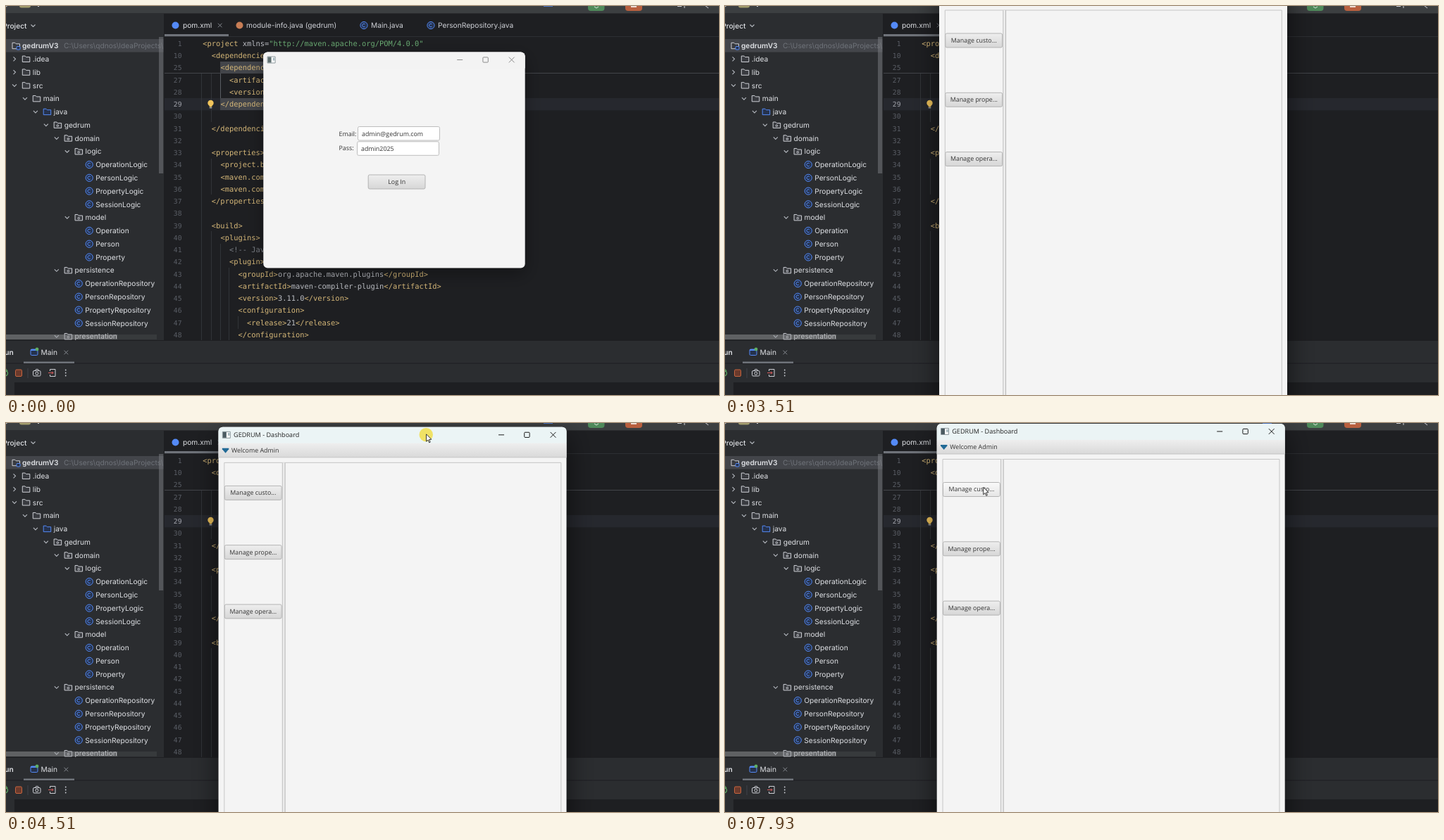
An HTML page with a canvas for the animation above (8000 ms loop, 1012 by 553 pixels).

```html
<!DOCTYPE html>
<html lang="en">
<head>
<meta charset="utf-8">
<title>Login and dashboard</title>
<style>
html, body { margin: 0; width: 100%; height: 100%; overflow: hidden; background: #1e1f22; }
canvas { display: block; width: 1012px; height: 553px; }
</style>
</head>
<body>
<canvas id="stage" width="1012" height="553"></canvas>
<script>
const ctx = document.getElementById('stage').getContext('2d');
const LOOP = 8000, STEP = 69;
const UI = 'Inter, sans-serif', FX = '"Open Sans", sans-serif', MONO = '"DejaVu Sans Mono", monospace';
const CHAR = 6.27, ROW = 18.78, LINE = 17.25;
const TAG = '#d5b778', PLAIN = '#bcbec4', GREEN = '#6aab73', DIM = '#7a7e85', BLUE = '#548af7', ICON = '#ced0d6';

// ---------- helpers ----------
function rect(x, y, w, h, fill) {
  ctx.fillStyle = fill;
  ctx.fillRect(x, y, w, h);
}
function box(x, y, w, h, r, fill, stroke, lw = 1) {
  ctx.beginPath();
  ctx.roundRect(x, y, w, h, r);
  if (fill) { ctx.fillStyle = fill; ctx.fill(); }
  if (stroke) { ctx.strokeStyle = stroke; ctx.lineWidth = lw; ctx.stroke(); }
}
function disc(x, y, r, fill, stroke) {
  box(x - r, y - r, 2 * r, 2 * r, r, fill, stroke);
}
function line(points, color, lw = 1) {
  ctx.beginPath();
  points.forEach(([x, y]) => ctx.lineTo(x, y));
  ctx.strokeStyle = color;
  ctx.lineWidth = lw;
  ctx.stroke();
}
function text(s, x, y, font, color, align = 'left') {
  ctx.font = font;
  ctx.fillStyle = color;
  ctx.textAlign = align;
  ctx.fillText(s, x, y);
}
function ui(s, x, y, color = '#dfe1e5', weight = 400) {
  text(s, x, y + 3.7, `${weight} 10.2px ${UI}`, color);
}
function fx(s, x, y, color = '#333', align = 'left', size = 8.9) {
  text(s, x, y + 3.2, `${size}px ${FX}`, color, align);
}
function shade(y, h, ...stops) {
  const g = ctx.createLinearGradient(0, y, 0, y + h);
  stops.forEach((c, i) => g.addColorStop(i / (stops.length - 1), c));
  return g;
}
function cross(x, y, r, color) {
  line([[x - r, y - r], [x + r, y + r]], color);
  line([[x + r, y - r], [x - r, y + r]], color);
}
function chevron(x, y, open) {
  line(open ? [[x - 3, y - 1.5], [x, y + 1.5], [x + 3, y - 1.5]]
            : [[x - 1.5, y - 3], [x + 1.5, y], [x - 1.5, y + 3]], '#b4b8bf', 1.1);
}

// ---------- IDE ----------
function folder(x, y, kind) {
  const c = kind === 'source' ? BLUE : ICON;
  ctx.beginPath();
  [[0, -4.2], [3.8, -4.2], [5.2, -2.7], [10.5, -2.7], [10.5, 4.2], [0, 4.2]]
    .forEach(([dx, dy]) => ctx.lineTo(x + dx, y + dy));
  ctx.closePath();
  ctx.fillStyle = kind === 'source' ? '#25324d' : '#393b40';
  ctx.fill();
  ctx.strokeStyle = c;
  ctx.lineWidth = 1;
  ctx.stroke();
  if (kind === 'package') disc(x + 5.2, y + 1, 1.3, null, c);
  if (kind === 'module') box(x + 6, y + 1, 5, 4.5, 1, '#25324d', BLUE);
}
function classIcon(x, y) {
  disc(x, y, 5.1, '#25324d', BLUE);
  ctx.beginPath();
  ctx.arc(x, y, 2.3, 0.8, 5.5);
  ctx.stroke();
}

const tree = [
  [0, '.idea', 'closed'], [0, 'lib', 'closed'], [0, 'src'], [1, 'main'], [2, 'java', 'source'],
  [3, 'gedrum', 'package'], [4, 'domain', 'package'], [5, 'logic', 'package'],
  ...['Operation', 'Person', 'Property', 'Session'].map(n => [6, n + 'Logic', 'class']),
  [5, 'model', 'package'],
  ...['Operation', 'Person', 'Property'].map(n => [6, n, 'class']),
  [4, 'persistence', 'package'],
  ...['Operation', 'Person', 'Property', 'Session'].map(n => [5, n + 'Repository', 'class']),
  [4, 'presentation', 'package']
];

function drawTree() {
  rect(0, 11, 224, 465, '#2b2d30');
  ctx.save();
  ctx.beginPath();
  ctx.rect(0, 11, 223.5, 464);
  ctx.clip();
  text('Project', 29.5, 31.5, `500 10.2px ${UI}`, '#dfe1e5', 'right');
  chevron(38.5, 28, true);
  rect(0, 47, 224, 18.6, '#43454a');
  folder(9, 56.5, 'module');
  ui('gedrumV3', 23, 56.5, '#dfe1e5', 600);
  ui('C:\\Users\\qdnos\\IdeaProjects\\gedrumV3', 82, 56.5, '#6f737a');
  tree.forEach(([depth, name, kind], i) => {
    const x = 12 + depth * 14.95, y = 75.3 + i * ROW;
    if (kind === 'class') {
      classIcon(x + 16.5, y);
      ui(name, x + 25.5, y);
    } else {
      chevron(x, y, kind !== 'closed');
      folder(x + 11.3, y, kind);
      ui(name, x + 25.8, y);
    }
  });
  rect(217, 44, 6.5, 194, 'rgba(125,127,130,.5)');
  rect(0, 467, 158, 7, 'rgba(150,152,155,.48)');
  rect(158, 467, 56, 7, 'rgba(120,122,125,.16)');
  ctx.restore();
}

// Each entry: line number, indent, text
const code = [
  [1, 0, '<project xmlns="http://maven.apache.org/POM/4.0.0"'],
  [10, 2, '<dependencies>'], [25, 4, '<dependency>'],
  [27, 6, '<artifactId>'], [28, 6, '<version>'], [29, 4, '</dependency>'], [30, 0, ''],
  [31, 2, '</dependencies>'], [32, 0, ''], [33, 2, '<properties>'],
  [34, 4, '<project.build.sourceEncoding>'], [35, 4, '<maven.compiler.source>'],
  [36, 4, '<maven.compiler.target>'], [37, 2, '</properties>'], [38, 0, ''],
  [39, 2, '<build>'], [40, 4, '<plugins>'], [41, 6, '<!-- Java compiler -->'], [42, 6, '<plugin>'],
  [43, 8, '<groupId>org.apache.maven.plugins</groupId>'],
  [44, 8, '<artifactId>maven-compiler-plugin</artifactId>'],
  [45, 8, '<version>3.11.0</version>'], [46, 8, '<configuration>'],
  [47, 10, '<release>21</release>'], [48, 8, '</configuration>']
];

function drawCode() {
  const font = `10.41px ${MONO}`;
  rect(225, 131, 787, 17.3, '#26282e');
  rect(225, 43, 787, 1, '#2d2f33');
  rect(225, 95, 787, 1, '#43454a');
  const guide = (x, y, end, c = '#313438') => rect(x, y, 1, end - y, c);
  guide(277, 96, 475);
  guide(291, 96, 165);
  guide(291, 217, 268);
  guide(291, 320, 475);
  guide(304, 96, 131, '#5a5d63');
  guide(304, 338, 475);
  guide(316, 372, 475);
  guide(329, 441, 459);
  rect(304, 79, 76, 16, '#43454a');
  rect(304, 131, 82, 17, '#43454a');
  code.forEach(([num, indent, s], i) => {
    const y = (i < 3 ? 53 + i * LINE : 105 + (i - 3) * LINE) + 3.7;
    text(num, 249.5, y, `9.7px ${MONO}`, num === 29 ? '#a1a3ab' : '#5a5e66', 'right');
    let x = 279.3 + indent * CHAR;
    for (const part of s.match(/<!--.*|<[^\s>]+>?|"[^"]*"|[^<"]+/g) || []) {
      const color = part.startsWith('<!') ? DIM : part[0] === '<' ? TAG : part[0] === '"' ? GREEN : PLAIN;
      text(part, x, y, font, color);
      x += part.length * CHAR;
    }
  });
  disc(290.5, 138, 4.2, '#f2c55c');
  rect(288.7, 141.5, 3.6, 2, '#f2c55c');
  rect(288.7, 144.3, 3.6, 1, '#ced0d6');
}

function drawTabs() {
  rect(225, 40, 91, 3, '#6f737a');
  disc(240.5, 27.5, 5, BLUE);
  ui('pom.xml', 251, 27.5);
  cross(303.7, 27.5, 2.8, '#868a91');
  disc(331.5, 27.5, 5, '#c77d55');
  ui('module-info.java (gedrum)', 341, 27.5, ICON);
  classIcon(508, 27.5);
  ui('Main.java', 518, 27.5, ICON);
  classIcon(603, 27.5);
  ui('PersonRepository.java', 613, 27.5, ICON);
}

function drawToolbar() {
  rect(0, 0, 1012, 10.5, '#3c3f41');
  line([[0, 1], [3, -1]], ICON);
  box(19, -8, 16, 10.5, 3, '#a19c6c');
  rect(45, 0, 2, 1, ICON);
  rect(763, 0, 13, 1, '#4a76c9');
  box(826, -10, 23.5, 17, 4, '#4f8a5b');
  line([[835, 1], [838, 3], [841, 1]], '#dfe8e0');
  box(879, -10, 24, 17, 4, '#b9603f');
  rect(887, 0, 8, 2, '#ecd9d0');
  line([[953, 0.5], [959, 0.5]], ICON);
  line([[963, 0], [963, 3]], ICON);
  line([[993, 0], [997, 3]], ICON);
}

function drawRunPanel() {
  rect(0, 475, 1012, 1, '#1e1f22');
  rect(0, 476, 1012, 59, '#2b2d30');
  rect(0, 507.5, 1012, 1, '#1e1f22');
  rect(0, 535, 12, 18, '#2b2d30');
  text('Run', 10.7, 495.7, `600 10.2px ${UI}`, '#dfe1e5', 'right');
  box(35, 488, 10, 8.5, 1.5, '#25324d', BLUE);
  rect(35, 488, 10, 2, BLUE);
  disc(44, 488, 2.4, '#5fad65');
  ui('Main', 49.5, 492);
  cross(85.3, 492.5, 2.8, '#868a91');
  rect(25, 505.5, 72, 2.5, '#6f737a');
  ctx.beginPath();
  ctx.arc(-1.5, 522, 4, -1.2, 2);
  ctx.strokeStyle = '#5fad65';
  ctx.lineWidth = 1.2;
  ctx.stroke();
  line([[0, 516], [2, 518.5], [-1, 520]], '#5fad65');
  box(13.5, 517, 9, 9.5, 1.5, '#6b3a2c', '#c7653f');
  rect(30.5, 515, 1, 14, '#43454a');
  box(38.5, 518.5, 10.5, 7.5, 1.5, null, ICON);
  line([[41.5, 518], [42.5, 516.5], [45.5, 516.5], [46.5, 518]], ICON);
  disc(43.8, 522.2, 2, null, ICON);
  line([[62.5, 519], [62.5, 516.5], [70, 516.5], [70, 526.5], [62.5, 526.5], [62.5, 524]], ICON);
  line([[60, 521.5], [67, 521.5]], '#db5c5c');
  line([[65, 519.5], [67, 521.5], [65, 523.5]], '#db5c5c');
  [517.5, 521.5, 525.5].forEach(y => disc(84.7, y, 0.9, ICON));
}

function drawIde() {
  rect(0, 0, 1012, 553, '#1e1f22');
  drawToolbar();
  drawTree();
  drawTabs();
  drawCode();
  drawRunPanel();
}

// ---------- application windows ----------
function windowFrame(x, y, w, h, active) {
  ctx.save();
  ctx.shadowColor = `rgba(0,0,0,${active ? 0.6 : 0.35})`;
  ctx.shadowBlur = active ? 38 : 24;
  ctx.shadowOffsetY = active ? 14 : 8;
  box(x, y, w, h, 6, '#f4f4f4');
  ctx.restore();
  box(x, y, w, 23, [6, 6, 0, 0], active ? '#ebf4f5' : '#f3f3f3');
  const c = active ? '#1a1a1a' : '#8c8c8c', right = x + w, cy = y + 11;
  line([[right - 96.5, cy], [right - 88.5, cy]], c);
  box(right - 59.8, cy - 3.6, 7.4, 7.2, 1, null, c);
  cross(right - 19, cy, 3.9, c);
  box(x + 5.8, cy - 4.5, 11, 9, 0, '#fff', '#8b979c');
  rect(x + 6.3, cy - 4, 5, 8, active ? '#4b5b62' : '#5f6f70');
  rect(x + 13.5, cy - 3, 2.5, 4, '#a5b9bf');
}
function button(label, x, y, state) {
  const fills = { hover: ['#fafafa', '#e6e6e6'], pressed: ['#c9c9c9', '#d6d6d6'] };
  const [a, b] = fills[state] || ['#efefef', '#d7d7d7'];
  const focus = state === 'pressed';
  box(x + 0.5, y + 0.5, 80.8, 20, 2, shade(y, 20, a, b), focus ? '#179fd3' : '#b3b3b3', focus ? 1.6 : 1);
  fx(label, x + 41, y + 10.2, '#333', 'center');
}
function field(value, x, y) {
  box(x + 0.5, y + 0.5, 116, 19.5, 2, '#fff', '#bdbdbd');
  fx(value, x + 6, y + 10.5);
}
function drawLogin(state) {
  windowFrame(365.3, 65.5, 371.4, 307, state === 'pressed');
  fx('Email:', 472.5, 181.7);
  fx('Pass:', 472.5, 202);
  field('admin@gedrum.com', 499, 171);
  field('admin2025', 498, 192.3);
  button('Log In', 513.7, 239.5, state);
}
function drawDashboard(x, y, hover) {
  windowFrame(x, y, 494, 620, true);
  fx('GEDRUM - Dashboard', x + 21.5, y + 11.2, '#222', 'left', 9.1);
  rect(x, y + 23, 494, 20, shade(y + 23, 20, '#eeeeee', '#d9d9d9'));
  rect(x, y + 42.5, 494, 1, '#c4c4c4');
  ctx.beginPath();
  [[5.3, 30], [14.7, 30], [14.7, 31.5], [10, 37], [5.3, 31.5]].forEach(([dx, dy]) => ctx.lineTo(x + dx, y + dy));
  ctx.fillStyle = '#216a96';
  ctx.fill();
  fx('Welcome Admin', x + 18.5, y + 32.8);
  const top = y + 50.5;
  box(x + 8.3, top, 478, 600, 0, null, '#c6c6c6');
  rect(x + 90.5, top, 4.5, 560, '#ececec');
  rect(x + 90.3, top, 1, 560, '#c2c2c2');
  rect(x + 94, top, 1, 560, '#b5b5b5');
  ['custo', 'prope', 'opera'].forEach((word, i) =>
    button(`Manage ${word}...`, x + 8.3, y + 83 + i * 84.3, hover && !i ? 'hover' : ''));
}

// ---------- pointer and motion ----------
function drawCursor(x, y, glow) {
  if (glow > 0) {
    ctx.globalAlpha = glow;
    disc(x - 0.3, y + 0.8, 9.7, 'rgba(240,222,70,.82)');
    ctx.globalAlpha = 1;
  }
  ctx.beginPath();
  [[0, 0], [0, 10.4], [2.4, 8.2], [4.1, 12], [5.7, 11.3], [4, 7.6], [7.3, 7.4]]
    .forEach(([dx, dy]) => ctx.lineTo(x + dx, y + dy));
  ctx.closePath();
  ctx.fillStyle = '#fff';
  ctx.fill();
  ctx.strokeStyle = '#222';
  ctx.lineWidth = 0.9;
  ctx.stroke();
}
function progress(t, start, end, first = 0) {
  if (t < start) return 0;
  const n = Math.round((end - start) / STEP);
  const k = Math.min(n, Math.floor((t - start) * n / (end - start) + 0.01));
  const p = (k + first) / (n + first);
  return p * p * (3 - 2 * p);
}
const mix = (a, b, p) => a + (b - a) * p;
function bend(a, c, b, p) {
  return a.map((v, i) => mix(mix(v, c[i], p), mix(c[i], b[i], p), p));
}

function pointer(t, win) {
  if (t < 450) return null;
  if (t < 1010) return bend([948, 545], [690, 330], [522, 222], progress(t, 450, 940));
  if (t < 2080) {
    const p = progress(t, 940, 1150);
    return [mix(522, 544.5, p), mix(222, 249.5, p)];
  }
  if (t < 2850) return bend([544.5, 249.5], [448, 95], [592, -14], progress(t, 2080, 2850, 1));
  if (t < 3510) return null;
  if (t < 5310) return [win[0] + 295, win[1] + 10];
  if (t < 7310) return [596.5, mix(11.5, 15.5, progress(t, 5310, 5510, 1))];
  return bend([596.5, 15.5], [470, 50], [366.7, 91.3], progress(t, 7310, 7930, 1));
}
function dashboardAt(t) {
  const drag = t < 3510 ? 0 : mix(0.07, 1, progress(t, 3510, 3970));
  const nudge = progress(t, 4370, 4660, 1);
  return [mix(304, 302, t < 3580 ? 0 : drag) - 1.3 * nudge, mix(-48.5, 8.5, drag) - 7.5 * nudge];
}

function render(t) {
  drawIde();
  const win = dashboardAt(t), pos = pointer(t, win);
  if (t < 1550) {
    const over = t >= 1080;
    drawLogin(t >= 1350 ? 'pressed' : over ? 'hover' : '');
  } else {
    drawDashboard(win[0], win[1], t >= 7790);
  }
  let glow = (t >= 1350 && t < 1550) || (t >= 3510 && t < 5310) ? 1 : 0;
  if (t >= 5310 && t < 5510) glow = 1 - progress(t, 5310, 5510, 1);
  if (pos) drawCursor(pos[0], pos[1], glow);
}

ctx.textRendering = 'geometricPrecision';
const began = performance.now();
function tick() {
  render((performance.now() - began) % LOOP);
  requestAnimationFrame(tick);
}
tick();
</script>
</body>
</html>
```
